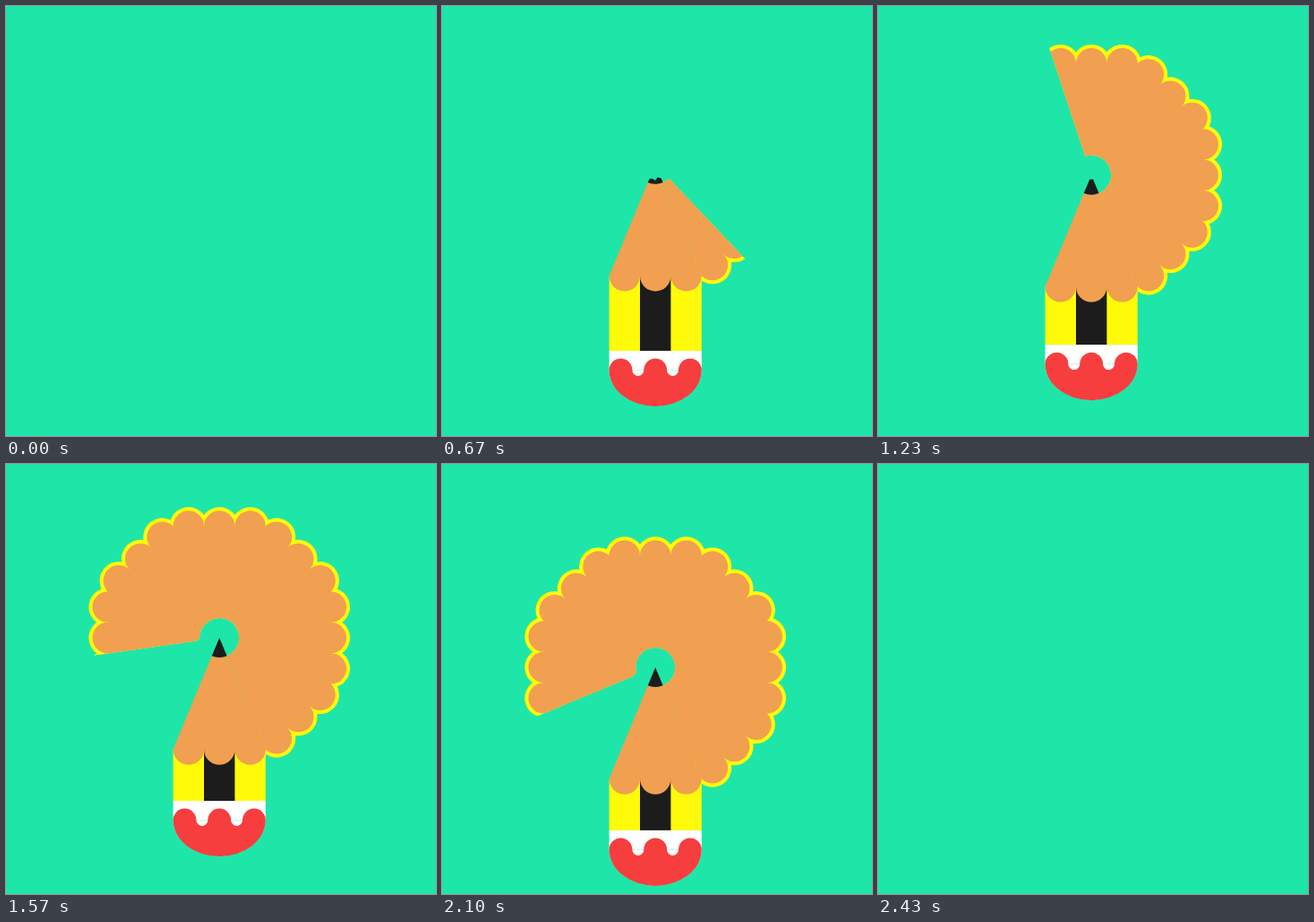
Write an HTML page with a canvas that moves like this. It is 480 by 480 pixels and loops after 2.71 s.

```html
<!DOCTYPE html>
<html lang="en">
<head>
<meta charset="utf-8">
<title>Sharpened pencil</title>
<style>
  html, body { margin: 0; height: 100%; overflow: hidden; background: #1ee6a8; }
  canvas { display: block; width: 480px; height: 480px; }
</style>
</head>
<body>
<canvas id="stage" width="480" height="480"></canvas>
<script>
const ctx = document.getElementById('stage').getContext('2d');
const { PI, min, max, cos, sin, tan } = Math;
const LOOP = 2710;
const COLOR = {
  back: '#1ee6a8', wood: '#f0a050', paint: '#fffa0a',
  lead: '#1c1c1c', cap: '#ffffff', rubber: '#f63e3e'
};

// The shaving is an octagon with three scallops per side.
const BUMP = 17.2;
const W = BUMP * 2;
const HALF = BUMP * 3;
const EDGE = HALF / tan(PI / 8);
const HOLE = 22;
const RIM = 4.1;
const START = PI * 3 / 8;
const SWEEP = PI * 1.5;
const WEDGES = 6;

const clamp = v => min(1, max(0, v));
const ease = (t, from, to) => (1 - cos(PI * clamp((t - from) / (to - from)))) / 2;

// Height of the top of the white cap.
function capY(t) {
  if (t < 430) return 362 + (430 - t) ** 2 / 300;
  if (t < 740) return 362 + 26 * ease(t, 430, 740);
  if (t < 1960) return 388 - 12 * ease(t, 740, 1420);
  if (t < 2105) return 376 + 33 * ease(t, 1960, 2105);
  return 409 - (t - 2105) ** 2 * 0.00525;
}

function fill(color, draw) {
  ctx.fillStyle = color;
  ctx.beginPath();
  draw();
  ctx.fill();
}

function rect(color, x, y, w, h) {
  ctx.fillStyle = color;
  ctx.fillRect(x, y, w, h);
}

function scallops(radius) {
  for (let i = 1; i <= WEDGES; i++) {
    ctx.save();
    ctx.rotate(-i * PI / 4);
    ctx.moveTo(0, 0);
    ctx.lineTo(HALF, EDGE);
    ctx.lineTo(-HALF, EDGE);
    ctx.closePath();
    for (const x of [-W, 0, W]) {
      ctx.moveTo(x + radius, EDGE);
      ctx.arc(x, EDGE, radius, 0, PI * 2);
    }
    ctx.restore();
  }
}

function shaving(angle) {
  if (angle < 0.002) return;
  const end = START - angle;
  const round = 7 * clamp((angle / SWEEP - 0.75) * 4);
  const out = HOLE + round;
  ctx.save();
  ctx.beginPath();
  ctx.arc(0, 0, HOLE, START + 0.02, end + min(angle, round / HOLE), true);
  ctx.quadraticCurveTo(HOLE * cos(end), HOLE * sin(end), out * cos(end), out * sin(end));
  ctx.arc(0, 0, 180, end, START + 0.02);
  ctx.closePath();
  ctx.clip();
  fill(COLOR.paint, () => scallops(BUMP + RIM));
  fill(COLOR.wood, () => scallops(BUMP));
  ctx.restore();
}

function cone() {
  fill(COLOR.wood, () => {
    ctx.arc(0, 0, HOLE, START, PI - START);
    for (const x of [-W, 0, W]) ctx.arc(x, EDGE, BUMP, PI, 0, true);
    ctx.closePath();
  });
}

// The broken top wears down until only the sharp point is left.
function lead(blunt) {
  ctx.save();
  ctx.beginPath();
  ctx.moveTo(0, 0);
  ctx.arc(0, 0, HOLE, START, PI - START);
  ctx.closePath();
  ctx.clip();
  const chips = [[-10, 19], [-6, 16.5], [-3, 16.5], [-0.5, 18.5], [2.5, 15], [6.5, 16], [10, 19]];
  fill(COLOR.lead, () => {
    ctx.moveTo(-10, HOLE + 2);
    for (const [x, y] of chips) ctx.lineTo(x, y * blunt);
    ctx.lineTo(10, HOLE + 2);
  });
  ctx.restore();
}

function eraser(y) {
  const r = HALF / 4;
  const mid = y + 21.5;
  rect(COLOR.cap, -HALF, y, HALF * 2, 21.5);
  fill(COLOR.cap, () => ctx.ellipse(0, mid, HALF, 40, 0, 0, PI));
  fill(COLOR.rubber, () => {
    ctx.arc(-3 * r, mid, r, PI, 0);
    ctx.arc(-1.5 * r, mid, r / 2, PI, 0, true);
    ctx.arc(0, mid, r, PI, 0);
    ctx.arc(1.5 * r, mid, r / 2, PI, 0, true);
    ctx.arc(3 * r, mid, r, PI, 0);
    ctx.ellipse(0, mid, HALF, 40.5, 0, 0, PI);
  });
}

function draw(t) {
  rect(COLOR.back, 0, 0, 480, 480);
  if (t < 130 || t >= 2430) return;
  const wear = ease(t, 583, 1583);
  const length = 208.8 - 26.8 * wear;
  ctx.save();
  ctx.translate(238.2, capY(t) - length);
  rect(COLOR.paint, -HALF, EDGE, HALF * 2, length - EDGE);
  rect(COLOR.lead, -BUMP, EDGE, W, length - EDGE);
  eraser(length);
  shaving(SWEEP * ease(t, 430, 1770));
  cone();
  lead(1 - wear);
  ctx.restore();
}

const begin = performance.now();
function tick() {
  draw((performance.now() - begin) % LOOP);
  requestAnimationFrame(tick);
}
tick();
</script>
</body>
</html>
```
